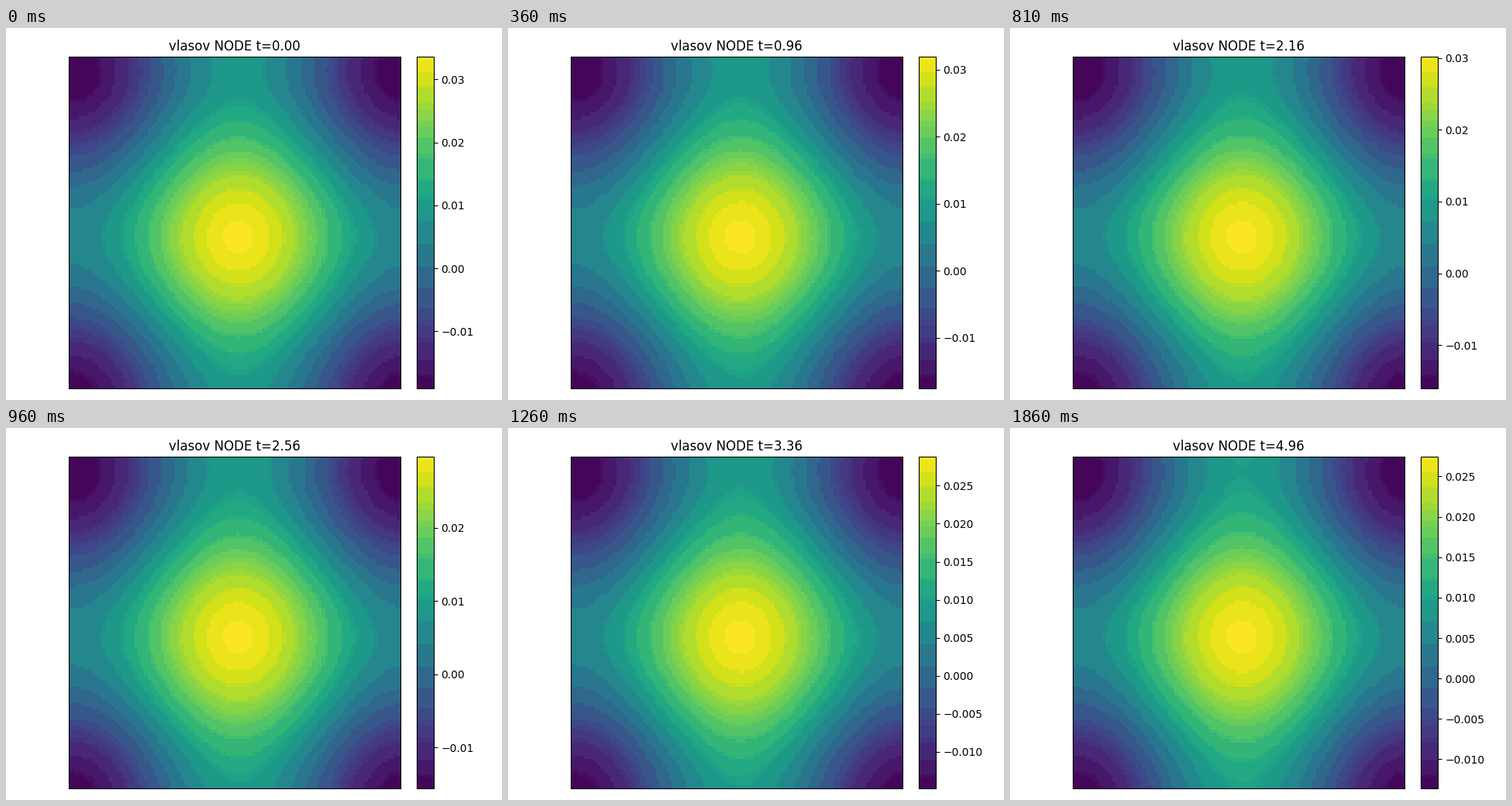
These frames come from a looping animation (640 by 480 pixels, 1.89 s). A matplotlib script:

```python
import numpy as np
import matplotlib.pyplot as plt
from matplotlib.animation import FuncAnimation
from matplotlib.colors import ListedColormap

W, H, DPI = 640, 480, 100
FRAMES, INTERVAL, DT = 63, 30, 0.08
CELLS = 101
CENTER_X, CENTER_Y = 51.2, 54.4

plt.rcParams["font.family"] = "DejaVu Sans"


def banded(name, steps):
    """Merge neighbouring colours of a map into flat bands of the RGB cube."""
    lut = (plt.get_cmap(name)(np.arange(256))[:, :3] * 255).astype(int)
    _, band = np.unique(lut // np.array(steps), axis=0, return_inverse=True)
    band = band.ravel()
    count = np.bincount(band)
    mean = [np.bincount(band, lut[:, c]) / count for c in range(3)]
    return ListedColormap(np.stack(mean, axis=1)[band] / 255)


def limits(t):
    decay = np.exp(-0.2 * t)
    return -0.01039 - 0.00866 * decay, 0.02379 + 0.00984 * decay


index = np.arange(CELLS)
cos_x = np.cos(2 * np.pi * (index - CENTER_X) / CELLS)[None, :]
cos_y = np.cos(2 * np.pi * (index - CENTER_Y) / CELLS)[:, None]


def field(t):
    q = 0.2325 - 0.0015 * t
    r = -0.0016 * t
    f = (0.5 - q) * cos_x + q * cos_y + r * cos_x * cos_y
    f = (f - f.min()) / np.ptp(f)
    low, high = limits(t)
    return low + (high - low) * f


def add_axes(x, y, w, h):
    return fig.add_axes([x / W, y / H, w / W, h / H])


fig = plt.figure(figsize=(W / DPI, H / DPI), dpi=DPI, facecolor="white")
ax = add_axes(81, 15, 428, 428)
cax = add_axes(530.4, 15, 21.4, 428)
ax.set_xticks([])
ax.set_yticks([])

image = ax.imshow(field(0), cmap=banded("viridis", (32, 16, 32)),
                  interpolation="nearest", aspect="auto")
image.set_clim(*limits(0))
fig.colorbar(image, cax=cax)
title = ax.set_title("vlasov NODE t=0.00", fontsize=12)


def update(i):
    t = i * DT
    image.set_data(field(t))
    image.set_clim(*limits(t))
    title.set_text(f"vlasov NODE t={t:.2f}")
    return image, title


anim = FuncAnimation(fig, update, frames=FRAMES, interval=INTERVAL,
                     repeat=True, blit=False)
plt.show()
```
